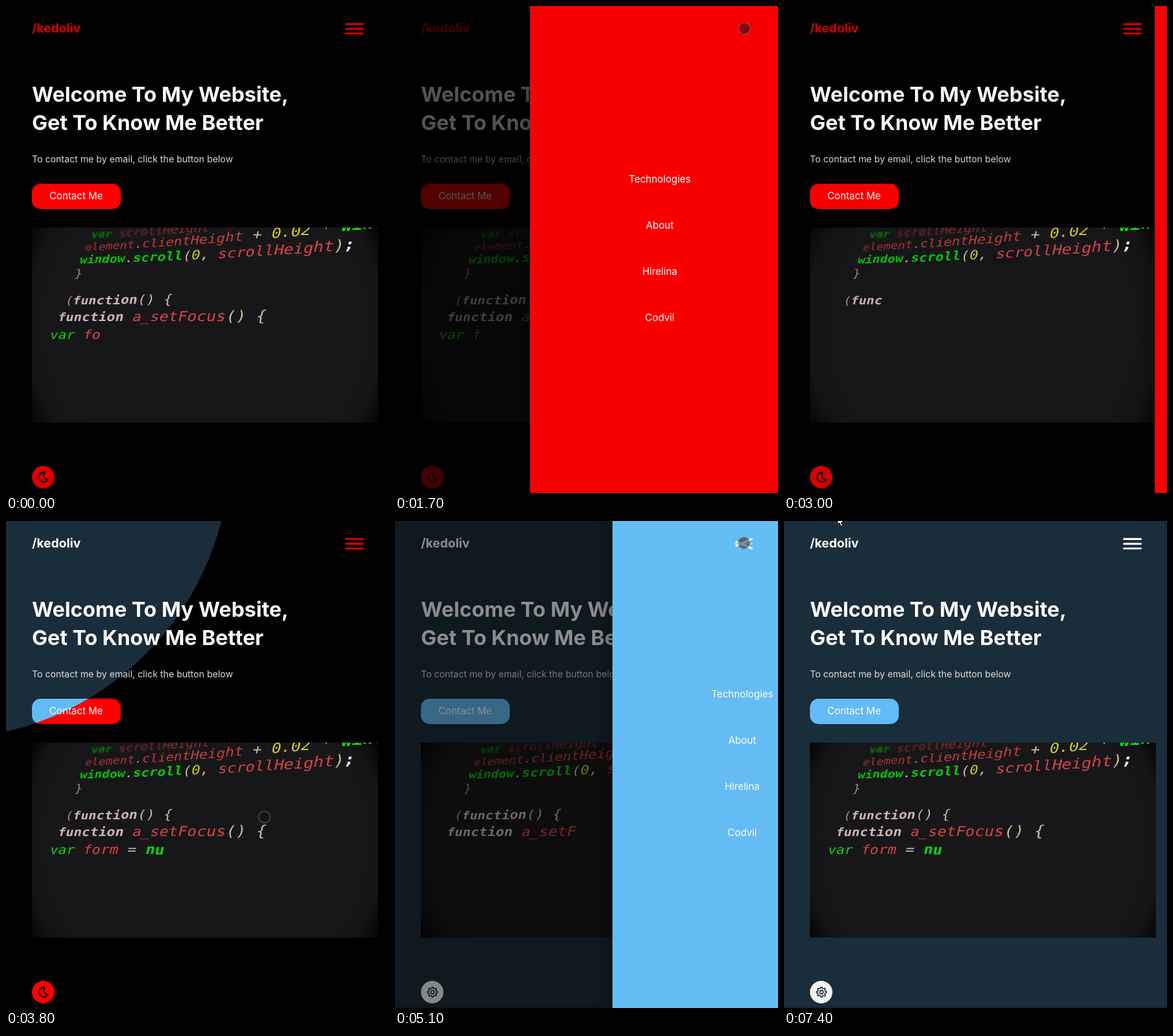
An HTML page with a canvas that plays this animation: 664x844 px, repeating every 7500 ms.

```html
<!DOCTYPE html>
<html lang="en">
<head>
<meta charset="utf-8">
<title>Portfolio page</title>
<style>
html, body { margin: 0; width: 100%; height: 100%; overflow: hidden; background: #000; }
canvas { display: block; }
</style>
</head>
<body>
<canvas id="stage" width="664" height="844"></canvas>
<script>
const W = 664, H = 844, LOOP = 7500, STEP = 100;
const ctx = document.getElementById('stage').getContext('2d');
const SANS = 'Inter, "Open Sans", sans-serif';
const MONO = '"DejaVu Sans Mono", monospace';
const HELD = [13, 24, 35, 45, 56, 67];

const DARK = { bg: '#000', foot: '#080004', logo: '#d90000', bars: '#d60000', accent: '#ff0000', drawer: '#f80000', knob: '#d90000' };
const BLUE = { bg: '#1a2d3a', foot: '#172436', logo: '#fff', bars: '#fff', accent: '#63bbf5', drawer: '#64bcf4', knob: '#f5f5f5' };

const RED = '#d84444', GREEN = '#08d808', TAN = '#c9bd98', PINK = '#cdb4b6', YELLOW = '#d2cc28';
// x, baseline, pitch, pitch growth, slope, bend, blur, parts (a leading * is bold)
const FIXED = [
  [147, 402, 11.6, .075, .05, .00005, 1.3, ['#0a7a0a', '*var ', '#8a2a2a', 'scrollHeight  =  0']],
  [136, 424, 11.5, .11, .05, .00006, .8, ['#a83434', 'element', '#a08070', '.', '#c43c3c', 'clientHeight ', TAN, '+ ', YELLOW, '0.02 ', TAN, '* ', '#10d810', '*window']],
  [127, 446, 12.5, .092, .024, .00006, .5, ['#08c008', '*window', PINK, '.', '#08c808', '*scroll', TAN, '(', YELLOW, '0', TAN, ', ', RED, 'scrollHeight', TAN, ')', '#e4f4f4', '*;']],
  [118, 470, 13, 0, 0, 0, .7, ['#9c8f70', '}']]
];
const TYPED = [
  [102, 517, 13, .095, .006, 0, .4, ['#a89870', '(', PINK, '*function', TAN, '() {']],
  [89, 546, 13.46, .097, .001, 0, .2, [PINK, '*function ', RED, 'a_setFocus', TAN, '() {']],
  [75, 577, 14.07, .09, -.003, 0, .2, [GREEN, 'var ', RED, 'form ', PINK, '= ', GREEN, '*null', TAN, ';']],
  [62, 608, 14.6, .095, -.006, 0, .2, [PINK, '*if ', TAN, '(', RED, 'document', TAN, '.', RED, 'getElementById', TAN, ') {']],
  [47, 640, 15.1, .1, -.01, 0, .3, [RED, 'form ', PINK, '= ', RED, 'document', TAN, '.', RED, 'forms', TAN, '[0];']]
];
const TYPING = [[0, 0], [100, 5], [400, 28], [600, 41], [700, 42], [900, 49], [1000, 56], [1250, 82], [1700, 107], [1800, 107]];
const POINTER = [
  [400, 500, 330], [800, 606, 39], [2600, 606, 39], [3200, 65, 816], [3400, 65, 816],
  [3800, 448, 513], [4400, 605, 38], [6700, 605, 38], [7200, 180, 16], [7400, 93, -8]
];

// Linear interpolation over rows that start with a time
function along(rows, t, k = 1) {
  let i = 1;
  while (i < rows.length - 1 && rows[i][0] < t) i++;
  const a = rows[i - 1], b = rows[i];
  const u = Math.max(0, Math.min(1, (t - a[0]) / (b[0] - a[0])));
  return a[k] + (b[k] - a[k]) * u;
}

// cubic-bezier(.25, .1, .25, 1)
function ease(x) {
  if (x <= 0) return 0;
  if (x >= 1) return 1;
  const curve = (p, q, s) => 3 * p * s * (1 - s) ** 2 + 3 * q * s * s * (1 - s) + s ** 3;
  let lo = 0, hi = 1;
  for (let i = 0; i < 20; i++) {
    const mid = (lo + hi) / 2;
    if (curve(.25, .25, mid) < x) lo = mid; else hi = mid;
  }
  return curve(.1, 1, lo);
}

function openness(t) {
  const slide = start => ease((t - start) / 500);
  return slide(1320) - slide(2635) + slide(4913) - slide(6437);
}

function text(str, x, y, font, color, align = 'left') {
  ctx.font = font + ' ' + SANS;
  ctx.fillStyle = color;
  ctx.textAlign = align;
  ctx.fillText(str, x, y);
}

function disc(x, y, r) {
  ctx.beginPath();
  ctx.arc(x, y, r, 0, 7);
}

// Draws one line of slanted code, returns the characters left to type
function codeLine([x0, y0, pitch, grow, slope, bend, blur, parts], left) {
  let i = 0;
  ctx.textAlign = 'left';
  for (let k = 0; k < parts.length; k += 2) {
    const bold = parts[k + 1].length > 1 && parts[k + 1][0] === '*' && parts[k + 1][1] !== ' ';
    ctx.fillStyle = parts[k];
    for (const ch of parts[k + 1].slice(bold ? 1 : 0)) {
      if (left-- <= 0) return 0;
      const dx = pitch * i + grow * i * i;
      const soft = blur * Math.max(0, 1 - dx / 330);
      ctx.filter = soft > .1 ? `blur(${soft.toFixed(2)}px)` : 'none';
      ctx.font = `${bold ? 'bold ' : ''}${((pitch + 2 * grow * i) / .602).toFixed(1)}px ${MONO}`;
      ctx.setTransform(1, 0, -.2, .88, x0 + dx, y0 - slope * dx - bend * dx * dx);
      ctx.fillText(ch, 0, 0);
      i++;
    }
  }
  return left;
}

function screen(t) {
  ctx.save();
  ctx.beginPath();
  ctx.rect(45, 384, 600, 338);
  ctx.clip();
  const glow = ctx.createRadialGradient(345, 553, 265, 345, 553, 346);
  glow.addColorStop(0, '#17171a');
  glow.addColorStop(.55, '#141416');
  glow.addColorStop(1, '#040405');
  ctx.fillStyle = glow;
  ctx.fillRect(45, 384, 600, 338);
  FIXED.forEach(line => codeLine(line, 99));
  let left = Math.floor(along(TYPING, (t + 700) % 1800));
  for (const line of TYPED) {
    if (left <= 0) break;
    left = codeLine(line, left);
  }
  ctx.restore();
}

function moon() {
  ctx.strokeStyle = '#000';
  ctx.lineWidth = 2;
  ctx.lineJoin = 'round';
  ctx.stroke(new Path2D('M67 808A8.5 8.5 0 1 0 73 821A8.2 8.2 0 0 1 67 808Z'));
}

function gear(color) {
  ctx.strokeStyle = color;
  ctx.lineWidth = 1.8;
  ctx.lineJoin = 'round';
  ctx.beginPath();
  for (let i = 0; i < 32; i++) {
    const r = i % 4 < 2 ? 8.7 : 6.5, a = (i - .5) * Math.PI / 16;
    ctx.lineTo(65 + r * Math.cos(a), 816.5 + r * Math.sin(a));
  }
  ctx.closePath();
  ctx.stroke();
  disc(65, 816.5, 3);
  ctx.stroke();
}

function bars(color, p) {
  const turn = p ** 1.5 * Math.PI / 4;
  ctx.strokeStyle = color;
  ctx.lineWidth = 3.4;
  ctx.lineCap = 'round';
  [[31.3, -1], [39.5, 0], [47.6, 1]].forEach(([y, dir]) => {
    const a = dir * turn;
    ctx.globalAlpha = dir ? 1 : 1 - p;
    ctx.beginPath();
    ctx.moveTo(618.5, y);
    ctx.lineTo(618.5 - 29 * Math.cos(a), y - 29 * Math.sin(a));
    ctx.stroke();
  });
  ctx.globalAlpha = 1;
}

function drawer(theme, p) {
  const x = Math.round(W - 446 * p);
  ctx.fillStyle = `rgba(0,0,0,${.7 * p})`;
  ctx.fillRect(0, 0, W, H);
  const shade = ctx.createLinearGradient(x - 30, 0, x, 0);
  shade.addColorStop(0, 'rgba(0,0,0,0)');
  shade.addColorStop(1, 'rgba(0,0,0,.22)');
  ctx.fillStyle = shade;
  ctx.fillRect(x - 30, 0, 30, H);
  ctx.fillStyle = theme.drawer;
  ctx.fillRect(x, 0, W - x, H);
  ['Technologies', 'About', 'Hirelina', 'Codvil'].forEach((label, i) =>
    text(label, x + 225, 306 + 80 * i, '17px', '#fff', 'center'));
}

function page(theme, t) {
  const p = openness(t);
  ctx.fillStyle = theme.bg;
  ctx.fillRect(0, 0, W, H);
  ctx.fillStyle = theme.foot;
  ctx.fillRect(0, 841, W, 3);
  text('/kedoliv', 45, 46, 'bold 21.5px', theme.logo);
  text('Welcome To My Website,', 45, 166, 'bold 36px', '#fff');
  text('Get To Know Me Better', 45, 215, 'bold 36px', '#fff');
  text('To contact me by email, click the button below', 45, 271, '15.9px', '#dcdcdc');
  ctx.fillStyle = theme.accent;
  ctx.beginPath();
  ctx.roundRect(45, 308, 154, 44, 15);
  ctx.fill();
  text('Contact Me', 121.5, 335, '16.9px', '#fff', 'center');
  screen(t);
  const hover = theme === DARK && t >= 3200;
  ctx.fillStyle = hover ? theme.accent : theme.knob;
  disc(64.5, 816.5, 19.5);
  ctx.fill();
  if (theme === DARK) moon(); else gear(theme.bg);
  if (p > .001) drawer(theme, p);
  bars(theme.bars, p);
}

function pointer(t) {
  if (t < 400 || (t > 2900 && t < 3100)) return;
  const x = along(POINTER, t, 1), y = along(POINTER, t, 2);
  if (t >= 7300) {
    ctx.save();
    ctx.translate(x, y);
    ctx.fillStyle = '#fff';
    ctx.strokeStyle = '#000';
    ctx.lineWidth = 1;
    const arrow = new Path2D('M0 0V14L3 11L6 17L8.5 16L6 10.5H10Z');
    ctx.fill(arrow);
    ctx.stroke(arrow);
    ctx.restore();
    return;
  }
  disc(x, y, 10);
  ctx.fillStyle = 'rgba(20,20,20,.48)';
  ctx.fill();
  ctx.strokeStyle = 'rgba(120,120,120,.42)';
  ctx.lineWidth = 2;
  ctx.stroke();
}

function draw(t) {
  const r = 502 + (t - 3800) * 1.75;
  if (r < 1250) page(DARK, t);
  if (r > 160) {
    ctx.save();
    disc(-113, -124, r);
    ctx.clip();
    page(BLUE, t);
    ctx.restore();
  }
  pointer(t);
}

let shown = -1;
const begin = performance.now();
function tick() {
  let step = Math.floor((performance.now() - begin) % LOOP / STEP);
  if (HELD.includes(step)) step--;
  if (step !== shown) draw((shown = step) * STEP);
  requestAnimationFrame(tick);
}
tick();
</script>
</body>
</html>
```
